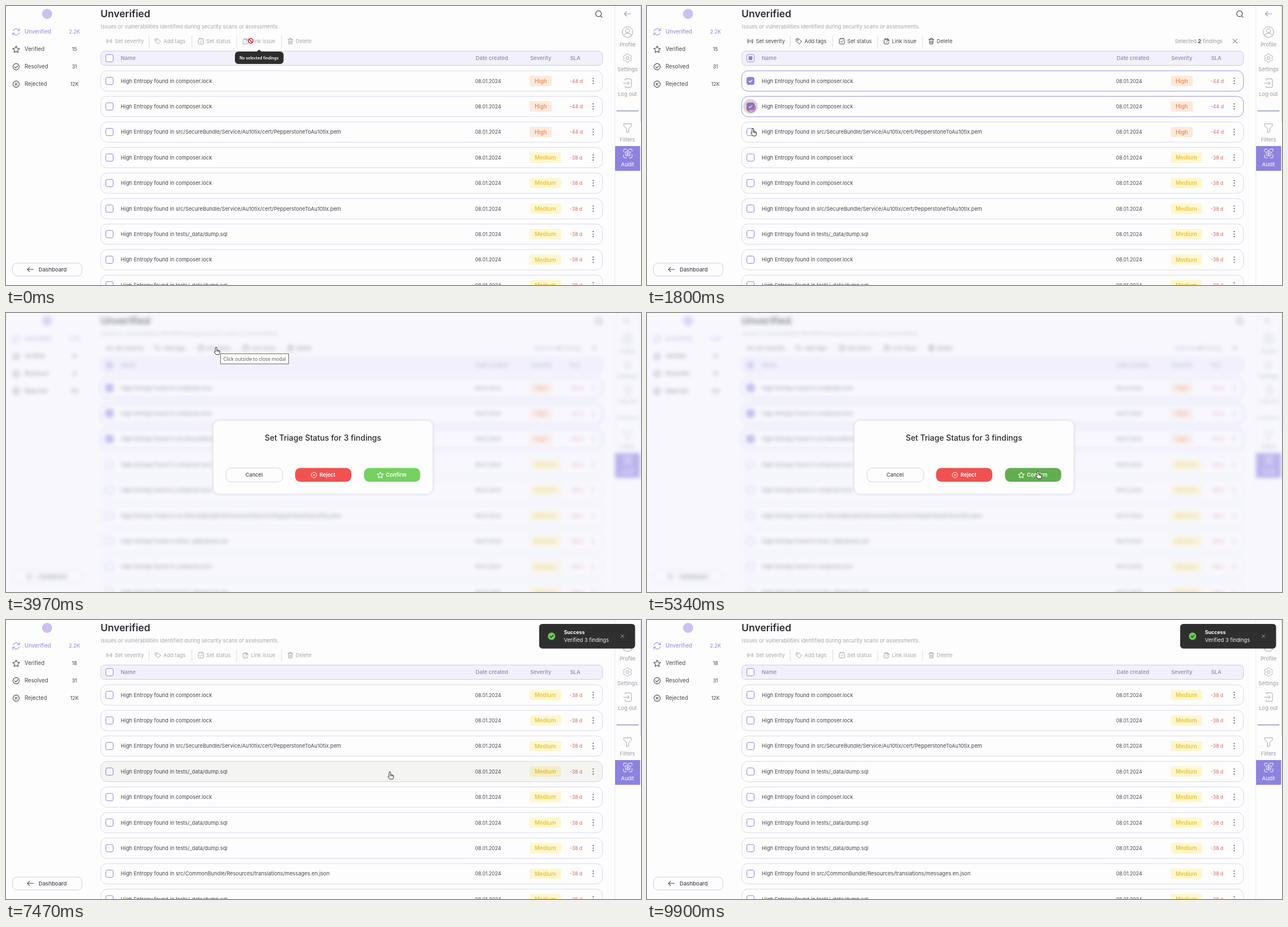
Write an HTML page that moves like this. It is 1129 px wide and 496 px high and loops after 9.93 s.

```html
<!DOCTYPE html>
<html lang="en">
<head>
<meta charset="utf-8">
<title>Triage findings</title>
<style>
  html, body { margin: 0; width: 100%; height: 100%; overflow: hidden; background: #fdfdfd; }
  svg { display: block; width: 100vw; height: 100vh; font-family: Inter, sans-serif; }
  text { white-space: pre; }
</style>
</head>
<body>
<svg viewBox="0 0 1129 496">
  <g id="page"></g>
  <g id="modal"></g>
  <g id="toast"></g>
  <g id="pointer"></g>
</svg>
<script>
const LOOP = 9930;
const PURPLE = '#8d82de', DARK = '#47474f', GREY = '#a6a6af', LINE = '#dad6ee';
const layer = Object.fromEntries(['page', 'modal', 'toast', 'pointer'].map(id => [id, document.getElementById(id)]));

// Drawing helpers, each returning markup
const text = (x, y, s, fill = DARK, size = 9.3, weight = 400, anchor = 'start') =>
  `<text x="${x}" y="${y}" fill="${fill}" font-size="${size}" font-weight="${weight}" text-anchor="${anchor}">${s}</text>`;
const box = (x, y, w, h, r, fill = 'none', stroke = 'none', extra = '') =>
  `<rect x="${x}" y="${y}" width="${w}" height="${h}" rx="${r}" fill="${fill}" stroke="${stroke}" ${extra}/>`;
const path = (d, stroke, width = 1, fill = 'none') =>
  `<path d="${d}" fill="${fill}" stroke="${stroke}" stroke-width="${width}" stroke-linecap="round" stroke-linejoin="round"/>`;
const ring = (x, y, r, stroke, width = 1, fill = 'none') =>
  `<circle cx="${x}" cy="${y}" r="${r}" fill="${fill}" stroke="${stroke}" stroke-width="${width}"/>`;
const cross = (x, y, r, stroke, width = 1) =>
  path(`M${x - r} ${y - r}l${2 * r} ${2 * r}m0 ${-2 * r}l${-2 * r} ${2 * r}`, stroke, width);
const tick = (x, y, stroke, width = 1.2) => path(`M${x - 2.7} ${y}l2 2 3.6-3.9`, stroke, width);
const arrowLeft = (x, y, stroke) => path(`M${x + 11} ${y}h-11l4-4m-4 4l4 4`, stroke, 1.1);

function polar(x, y, count, radius) {
  return 'M' + Array.from({ length: count }, (_, i) => {
    const a = i / count * 2 * Math.PI - Math.PI / 2, r = radius(i);
    return `${(x + r * Math.cos(a)).toFixed(2)} ${(y + r * Math.sin(a)).toFixed(2)}`;
  }).join('L') + 'z';
}
const star = (x, y, r, stroke) => path(polar(x, y, 10, i => i % 2 ? r * 0.5 : r), stroke, 1.1);

// Table contents
const LOCK = 'composer.lock', DUMP = 'tests/_data/dump.sql';
const PEM = 'src/SecureBundle/Service/Au10tix/cert/PepperstoneToAu10tix.pem';
const JSON_FILE = 'src/CommonBundle/Resources/translations/messages.en.json';
const BEFORE = [LOCK, LOCK, PEM, LOCK, LOCK, PEM, DUMP, LOCK, DUMP];
const AFTER = [LOCK, LOCK, PEM, DUMP, LOCK, DUMP, DUMP, JSON_FILE, DUMP];
const rowY = i => 133.2 + i * 45.4;

// Timeline in ms
const CHECKS = [1060, 1650, 2070];
const OPEN = 3300, CLOSE = 5600, RELOAD = 5900, COUNT = 6900, TOAST = 5720;
const CLICKS = [[1060, 185, 135], [1650, 185, 181], [2070, 186, 226], [3190, 374, 64], [5480, 696, 284]];
const CURSOR = [
  [0, 434, 58], [240, 434, 58], [800, 186, 127], [1200, 186, 128], [1450, 184, 173], [1680, 184, 173],
  [1795, 188, 218], [2300, 188, 218], [2950, 373.5, 61], [4540, 373.5, 61], [5200, 695, 281.5],
  [5760, 695, 281.5], [6200, 682.5, 270], [7850, 682.5, 270], [8300, 702, 81], [8560, 714, -20], [LOOP, 714, -20]
];
const BOUNCE = [[0, -62], [0.6, 5], [0.75, -2], [0.9, 1], [1, 0]];

const clamp = v => Math.max(0, Math.min(1, v));
const smooth = v => v * v * (3 - 2 * v);
function along(keys, t) {
  const i = Math.max(1, keys.findIndex(k => k[0] >= t));
  const a = keys[i - 1], b = keys[i], k = smooth(clamp((t - a[0]) / (b[0] - a[0])));
  return a.slice(1).map((v, n) => v + (b[n + 1] - v) * k);
}

function sideNav(count) {
  const items = [['Unverified', '2.2K', 46], ['Verified', count, 77], ['Resolved', '31', 108], ['Rejected', '12K', 139]];
  return ring(73, 14, 9, 'none', 0, '#cdbff0') +
    items.map(([name, n, y], i) => text(33, y + 3.3, name, i ? DARK : PURPLE, 9.7) +
      text(121.7, y + 3.2, n, i ? DARK : PURPLE, 8.9, 400, 'middle')).join('') +
    path('M12.3 44.5a6 6 0 0 1 10.3-2l1.2 1.3M24 40v3.8h-3.8M23.7 47.5a6 6 0 0 1-10.3 2l-1.2-1.3M12 52v-3.8h3.8', PURPLE) +
    star(18, 77.5, 6.3, DARK) +
    ring(18, 108, 5.6, DARK, 1.1) + tick(18, 108.2, DARK) +
    ring(18, 139, 5.6, DARK, 1.1) + cross(18, 139, 1.8, DARK, 1.2) +
    box(11.5, 457, 123.5, 23, 8, '#fdfdfd', '#cfcaec') + arrowLeft(38, 468.3, DARK) +
    text(58, 471.6, 'Dashboard', DARK, 9.6, 500);
}

function rightNav() {
  const label = (y, s, fill = '#9a9aa4') => text(1105, y, s, fill, 9.3, 400, 'middle');
  return path('M1082.5 0V496', '#e9e7f4') + path('M1128.5 0V206', '#cfd8e8') +
    arrowLeft(1099.5, 14, '#9a94bd') +
    ring(1105, 46.5, 9.4, GREY) + ring(1105, 44, 3.6, GREY) + path('M1098.5 53.2c1-3.8 3.3-5 6.5-5s5.5 1.2 6.5 5', GREY) +
    label(71.6, 'Profile') +
    path(polar(1105, 92.5, 72, i => 6.9 + 0.9 * Math.cos(i / 72 * 12 * Math.PI)), GREY) + ring(1105, 92.5, 2.6, GREY) +
    label(116, 'Settings') +
    path('M1101 132v-2.5h9q2 0 2 2v11q0 2-2 2h-9v-2.5M1098 137.2h10m-3-3l3 3-3 3', GREY) +
    label(160, 'Log out') + path('M1086 186.5h38', '#8c93b8', 1.3) +
    path('M1098.5 209.5h13.5v3.5l-4.7 5v5.5l-4 2v-7.5l-4.8-5z', GREY) + label(240.6, 'Filters') +
    box(1083, 249, 44.5, 44, 0, PURPLE) +
    path('M1098 259v-2.5q0-2 2-2h3M1113 264v4q0 2-2 2h-3M1103 270h-3q-2 0-2-2v-3M1107 254.5h6v4', '#fff') +
    path(polar(1105.5, 262, 60, i => 4.7 + 0.9 * Math.cos(i / 60 * 10 * Math.PI)), '#fff') +
    path('M1105.5 257v10M1101.5 260l4 2.5 4-2.5M1102 265l3.5-2.5 3.5 2.5', '#fff', 0.8) +
    label(284.6, 'Audit', '#fff');
}

function toolbar(selected) {
  const ink = selected ? DARK : GREY;
  const labels = [[193.5, 'Set severity'], [280, 'Add tags'], [356, 'Set status'], [435.5, 'Link issue'], [515, 'Delete']];
  return labels.map(([x, s]) => text(x, 65.7, s, ink, 9.25)).join('') +
    path('M254.5 53v20M330.5 53v20M410 53v20M490 53v20', '#dddde3') +
    ring(183.5, 62.5, 1, ink, 0.9) +
    path('M181 60q-1.5 2.5 0 5M186 60q1.5 2.5 0 5M179.5 59q-1.8 3.5 0 7M187.5 59q1.8 3.5 0 7', ink, 0.9) +
    path('M265.5 58.5h4.5l5 4.5-4.2 4.5-5.3-4.8z', ink) + ring(268, 61, 0.8, ink, 0.8) +
    box(342, 58, 9, 9.5, 1.5, 'none', ink) + path('M344.5 57v2M348.5 57v2M344.5 63l1.5 1.5 2.8-3', ink) +
    path('M424 59h-1q-1.5 0-1.5 1.5v5.5q0 1.5 1.5 1.5h5q1.5 0 1.5-1.5v-1M424 58h4.5v2h-4.5zM425 65l5-5m-3 0h3v3', ink) +
    path('M501 59.5h9M503.5 59.5v-2h4v2M502.2 59.5l.5 8h5.6l.5-8M504.5 62v3.5M506.7 62v3.5', ink) +
    (selected ? text(938.5, 65.7, `Selected <tspan font-weight="700" fill="${DARK}">${selected}</tspan> findings`, '#9a9aa3') +
      cross(1045.5, 62.5, 3.7, DARK) : '');
}

function tableRow(file, i, high, checked, hovered) {
  const y = rowY(i), base = y + 3.3;
  const badge = high ? ['High', 39.5, '#fdeadc', '#ef9060'] : ['Medium', 56, '#fdf7d0', '#eec431'];
  return box(168.5, y - 18, 892, 36.2, 11, '#fdfdfd', checked ? '#9d93e2' : LINE) +
    box(177.5, y - 6.5, 13, 13, 2.8, checked ? PURPLE : '#fdfdfd', PURPLE) + (checked ? tick(184, y + 0.3, '#fff', 1.4) : '') +
    text(204, base, 'High Entropy found in ' + file) + text(834, base, '08.01.2024', DARK, 8.7) +
    box(931, y - 9.3, badge[1], 18.6, 3.5, badge[2]) + text(931 + badge[1] / 2, base + 0.2, badge[0], badge[3], 9.7, 600, 'middle') +
    text(1002, base, high ? '-44 d' : '-38 d', '#dc6969', 8.8) +
    [-4.6, 0, 4.6].map(d => ring(1044, y + d, 1.15, 'none', 0, '#6c6c75')).join('') +
    (hovered ? box(168.5, y - 18, 892, 36.2, 11, 'rgba(50,45,20,.045)') : '');
}

function pageMarkup(selected, reloaded, hover, count) {
  const head = (x, s) => text(x, 95.8, s, '#9a96b2', 9.4, 600);
  return box(0, 0, 1129, 496, 0, '#fdfdfd') + sideNav(count) + rightNav() +
    text(168, 19.8, 'Unverified', '#2c2c33', 17.6, 600) +
    text(168.5, 40.2, 'Issues or vulnerabilities identified during security scans or assessments.', GREY, 9.25) +
    ring(1053.5, 13.8, 5.1, DARK, 1.2) + path('M1057.3 17.6l2.5 2.5', DARK, 1.2) +
    toolbar(selected) +
    box(168.5, 80, 892, 25.6, 7, '#f2f0fb', '#cfcaee') + box(177.5, 86.3, 13, 13, 2.8, '#fdfdfd', PURPLE) +
    (selected ? box(180.5, 89.3, 7, 7, 0.8, PURPLE) : '') +
    head(204, 'Name') + head(835, 'Date created') + head(932, 'Severity') + head(1003, 'SLA') +
    (reloaded ? AFTER : BEFORE).map((file, i) => tableRow(file, i, !reloaded && i < 3, i < selected, i === hover)).join('');
}

function modalMarkup(hot) {
  return box(0, 0, 1129, 496, 0, 'rgba(240,240,253,.45)') +
    box(368.5, 191, 390.5, 131, 11, '#fdfdfd', '#e6e4f0', 'style="filter:drop-shadow(0 0 2px #dddbe9)"') +
    text(563.5, 227.3, 'Set Triage Status for 3 findings', '#2a2a30', 14, 500, 'middle') +
    box(391, 275.5, 101, 25, 10, '#fdfdfd', '#d3d2de') + text(441, 291.2, 'Cancel', DARK, 9.2, 500, 'middle') +
    box(514, 275.5, 100, 24.5, 9, '#f05252') + ring(547.5, 288, 4.8, '#fff') + cross(547.5, 288, 1.6, '#fff') +
    text(557.5, 291.2, 'Reject', '#fff', 9.3, 600) +
    box(636.5, 275.5, 100, 24.5, 9, hot ? '#62ad51' : '#75d160') + star(665.5, 288.4, 5.6, '#fff') +
    text(675.5, 291.2, 'Confirm', '#fff', 9.3, 600);
}

const TOAST_MARKUP = box(948, 7, 170.5, 43.7, 5.5, '#302f2f') + ring(970, 28.8, 6.6, 'none', 0, '#6ccb52') +
  tick(970, 29, '#302f2f', 1.4) + text(992, 25, 'Success', '#fff', 8.9, 700) +
  text(992, 38.6, 'Verified 3 findings', '#f0f0f0', 9.25) + cross(1096, 28.8, 2.7, '#a5a5a5');

const BLOCKED = box(407, 81, 86.5, 22, 6, '#2e2d2d') + path('M446 81l4-3.5 4 3.5z', 'none', 0, '#2e2d2d') +
  text(450, 94.6, 'No selected findings', '#fff', 7, 600, 'middle');
const BAN = ring(435, 62, 4.4, '#fff', 3, '#fdfdfd') + ring(435, 62, 4.2, '#c4232b', 1.6) + path('M432.2 59.2l5.6 5.6', '#c4232b', 1.6);
const HINT = box(381.5, 72.5, 121, 18, 0, '#fdfdfd', '#6d6d6d') +
  `<text x="386.5" y="84.6" font-size="8.6" fill="#55555a" font-family="Open Sans, sans-serif">Click outside to close modal</text>`;
const HAND = path('M0 0c.9 0 1.4.6 1.4 1.4V5l4 .9c1 .2 1.5.9 1.4 1.8l-.6 3.3-.9 2H.2L-3.1 9c-.6-1 .3-1.8 1.2-1.3l.5.6V1.4C-1.4.6-.9 0 0 0z', '#2b2b2b', 1, '#fff') +
  path('M1.4 5v2.5M3.4 5.6v2.2M5.2 6v2', '#2b2b2b', 0.8);

function clickMarkup(t) {
  return CLICKS.map(([start, x, y], i) => {
    const age = t - start;
    if (age < 0 || age > 260) return '';
    const halo = i < 3 ? ring(184, rowY(i), 13, 'none', 0, 'rgba(95,90,120,.24)') : '';
    return halo + ring(x, y, 3 + 4.6 * Math.min(1, age / 150), '#df4b62', 1.4);
  }).join('');
}

const shown = {};
function put(name, markup) {
  if (shown[name] !== markup) layer[name].innerHTML = shown[name] = markup;
}

function render(now) {
  const t = now % LOOP;
  const [x, y] = along(CURSOR, t);
  const fade = clamp((t - OPEN) / 180) * (1 - clamp((t - CLOSE) / 120));
  const reloaded = t >= RELOAD;
  const selected = reloaded ? 0 : CHECKS.filter(c => t >= c).length;
  const hover = !fade && x > 200 ? BEFORE.findIndex((_, i) => Math.abs(y - rowY(i)) < 18) : -1;
  const hot = x > 636 && x < 737 && y > 275 && y < 301;

  put('page', pageMarkup(selected, reloaded, hover, t >= COUNT ? '18' : '15'));
  layer.page.style.filter = fade ? `blur(${3.7 * fade}px)` : 'none';
  put('modal', fade ? modalMarkup(hot) : '');
  layer.modal.style.opacity = fade;

  put('toast', t >= TOAST ? TOAST_MARKUP : '');
  const [drop] = along(BOUNCE, clamp((t - TOAST) / 700));
  layer.toast.setAttribute('transform', `translate(0 ${drop})`);

  const blocked = t < 240;
  const hint = t > 3850 && t < 4560;
  put('pointer', clickMarkup(t) + (hint ? HINT : '') +
    (blocked ? BLOCKED + BAN : `<g transform="translate(${x.toFixed(2)} ${y.toFixed(2)})">${HAND}</g>`));
}

const begin = performance.now();
(function frame() {
  render(performance.now() - begin);
  requestAnimationFrame(frame);
})();
</script>
</body>
</html>
```
